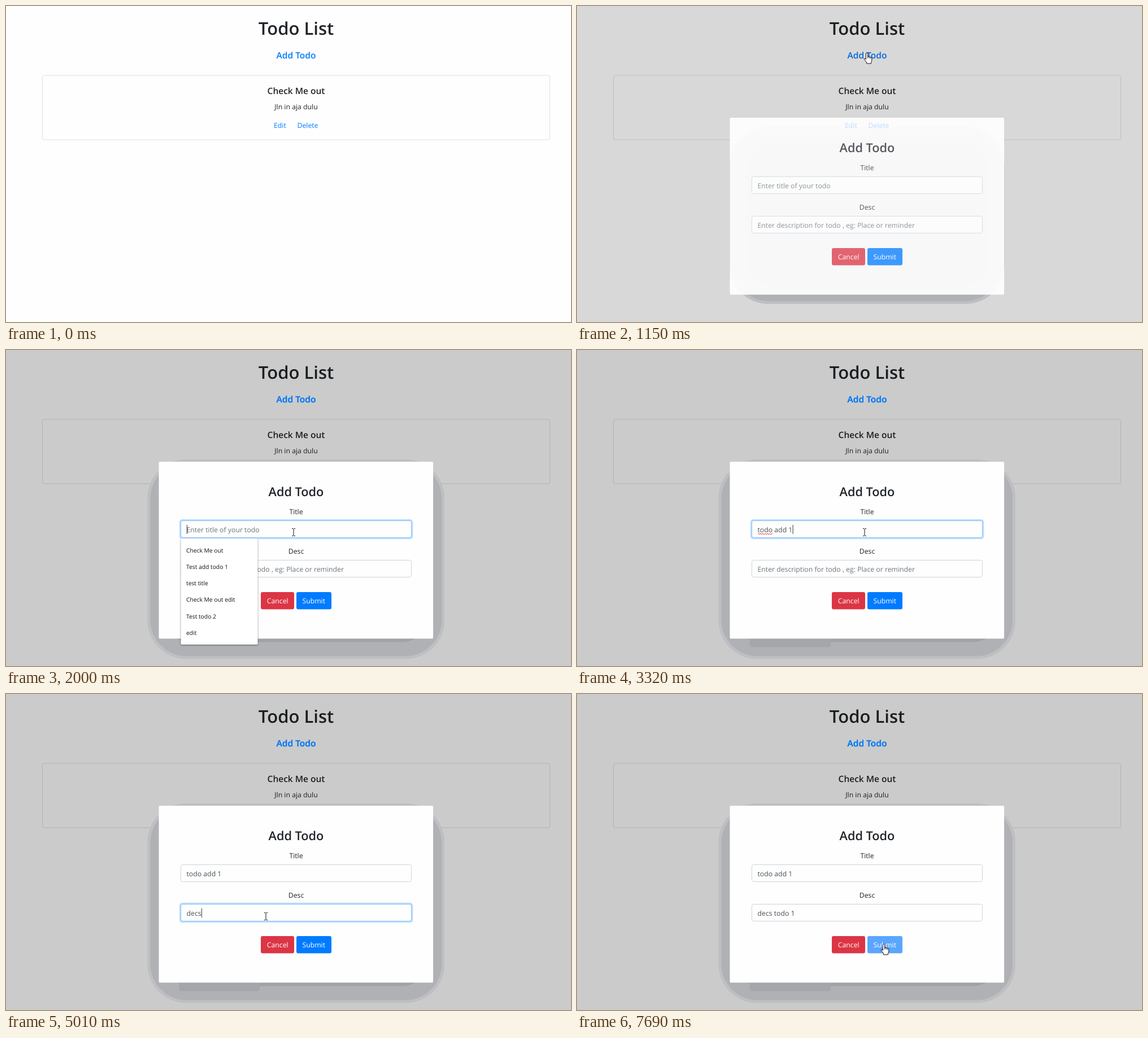
An HTML page that plays this animation: 1000 px wide and 560 px high, repeating every 8000 ms.

```html
<!DOCTYPE html>
<html lang="en">
<head>
<meta charset="utf-8">
<title>Todo List</title>
<style>
  html, body { margin: 0; width: 100%; height: 100%; overflow: hidden; background: #fefefe; }
  svg { display: block; width: 100vw; height: 100vh; }
  text {
    font: 12.26px "Open Sans", "Noto Sans", sans-serif;
    fill: #212529;
    text-rendering: geometricPrecision;
  }
  .mid { text-anchor: middle; }
  .h1 { font-size: 31px; font-weight: 600; }
  .h3 { font-size: 21.7px; font-weight: 600; }
  .h5 { font-size: 15.5px; font-weight: 600; }
  .link { fill: #007bff; }
  .hint { fill: #6c757d; }
  .value { fill: #495057; }
  .onButton { fill: #fff; }
  .option { font-size: 10.3px; font-weight: 500; fill: #111; }
  .caret { stroke: #333; stroke-width: 1; }
  .squiggle { fill: none; stroke: #e33; stroke-width: 1; }
  .list { filter: drop-shadow(0 1px 1.5px rgba(0, 0, 0, .45)); }
  .cursor { fill: #fff; stroke: #111; stroke-width: 1; stroke-linejoin: round; }
</style>
</head>
<body>
<svg id="stage" viewBox="0 0 1000 560" preserveAspectRatio="none"></svg>
<script>
const LOOP = 8000;
const stage = document.getElementById('stage');

function el(parent, tag, attrs = {}, content = '') {
  const node = document.createElementNS('http://www.w3.org/2000/svg', tag);
  set(node, attrs);
  node.textContent = content;
  return parent.appendChild(node);
}
function set(node, attrs) {
  for (const key in attrs) node.setAttribute(key, attrs[key]);
}
const group = (parent = stage) => el(parent, 'g');
const box = (parent, x, y, width, height, rx, attrs) =>
  el(parent, 'rect', { x, y, width, height, rx, ...attrs });
const label = (parent, x, y, content, cls = '') =>
  el(parent, 'text', { x, y, class: cls }, content);
const centered = (parent, x, y, content, cls = '') => label(parent, x, y, content, 'mid ' + cls);
const show = (node, on) => node.setAttribute('visibility', on ? 'visible' : 'hidden');
const fadeTo = (node, opacity) => node.setAttribute('opacity', opacity);

const clamp = v => Math.min(1, Math.max(0, v));
const ramp = (t, from, to) => clamp((t - from) / (to - from));
const within = (t, from, to) => t >= from && t < to;

// cubic-bezier(.25, .1, .25, 1)
function ease(x) {
  const bezier = (u, a, b) => 3 * u * (1 - u) ** 2 * a + 3 * u * u * (1 - u) * b + u ** 3;
  let low = 0, high = 1;
  for (let i = 0; i < 20; i++) {
    const mid = (low + high) / 2;
    if (bezier(mid, .25, .25) < x) low = mid; else high = mid;
  }
  return bezier(low, .1, 1);
}

// Page
const page = group();
box(page, 0, 0, 1000, 560, 0, { fill: '#fefefe' });
centered(page, 513.5, 51, 'Todo List', 'h1');
centered(page, 513.5, 93, 'Add Todo', 'h5 link');
box(page, 64.5, 123, 898, 114, 3, { fill: 'none', stroke: '#dfdfdf' });
centered(page, 513.5, 155.5, 'Check Me out', 'h5');
centered(page, 513.5, 183, 'Jln in aja dulu');

const shade = box(stage, 0, 0, 1000, 560, 0, { fill: '#000' });
const brightLink = centered(stage, 513.5, 93, 'Add Todo', 'h5 link');

// Modal shadow in three tones, from the outer edge inwards
const modal = { x: 270.5, y: 198, width: 485.5, height: 313.5 };
const shadows = [
  { reach: 20, radius: 68, fill: '#bebfc2' },
  { reach: 15, radius: 64, fill: '#b0b1b5' },
  { reach: -10, radius: 44, fill: '#a1a2a8' }
].map(tone => ({ ...tone, node: box(stage, 0, 0, 0, 0, tone.radius, { fill: tone.fill }) }));
const listResidue = box(stage, 306, 505, 143, 21.5, 4, { fill: '#a5a6ab' });

const plate = box(stage, modal.x, modal.y, modal.width, modal.height, 2, { fill: '#fefefe' });
const cardLinks = group();
label(cardLinks, 474, 215.5, 'Edit', 'link');
label(cardLinks, 515.5, 215.5, 'Delete', 'link');

// Modal content
const form = group();
centered(form, 513.5, 259, 'Add Todo', 'h3');

function squiggle(parent, x, y) {
  return el(parent, 'path', { class: 'squiggle', d: `M${x} ${y}q1 -2 2 0` + 't2 0'.repeat(12) });
}

function field(name, top, hint, focusAt, blurAt, keys, squiggles) {
  centered(form, 513.5, top - 11.3, name);
  box(form, 309.5, top + .5, 408, 30, 3, { fill: '#fefefe', stroke: '#ced4da' });
  const ring = group(form);
  box(ring, 308, top - 1, 411, 33, 4, { fill: 'none', stroke: '#bfdeff', 'stroke-width': 2.6 });
  box(ring, 309.5, top + .5, 408, 30, 3, { fill: 'none', stroke: '#80bdff' });
  const baseline = top + 21.2;
  return {
    focusAt, blurAt, keys, ring,
    hint: label(form, 319.5, baseline, hint, 'hint'),
    value: label(form, 319.5, baseline, '', 'value'),
    caret: el(form, 'line', { class: 'caret', y1: top + 8, y2: top + 24 }),
    squiggles: squiggles.map(([x, at]) => ({ at, node: squiggle(form, x, top + 24) }))
  };
}

const fields = [
  field('Title', 302, 'Enter title of your todo', 1850, 4290, {
    text: 'todo add 1',
    times: [2330, 2490, 2580, 2680, 2770, 2860, 2960, 3120, 3290, 3320]
  }, [[320, 2770]]),
  field('Desc', 372, 'Enter description for todo , eg: Place or reminder', 4290, 7290, {
    text: 'decs todo 1',
    times: [4490, 4720, 4970, 5010, 5750, 5880, 6030, 6110, 6190, 6270, 6350]
  }, [[320, 5750], [349, 6270]])
];

box(form, 451, 429, 59, 30.5, 3, { fill: '#dc3545' });
centered(form, 480.7, 449, 'Cancel', 'onButton');
const submit = box(form, 514, 429, 62, 30.5, 3);
centered(form, 544.7, 449, 'Submit', 'onButton');

// Suggestions
function suggestions(width, options) {
  const list = group();
  box(list, 309.5, 334, width, options.length * 29.2 + 12.8, 2, { fill: '#fff', class: 'list' });
  options.forEach((option, i) => label(list, 319, 358.8 + i * 29.2, option, 'option'));
  return list;
}
const allOptions = suggestions(136, ['Check Me out', 'Test add todo 1', 'test title',
  'Check Me out edit', 'Test todo 2', 'edit']);
const fewOptions = suggestions(117, ['Test add todo 1', 'test title', 'Test todo 2']);

// Mouse pointer, each shape drawn around its hot spot
const pointer = group();
const shapes = {
  arrow: 'M0 0V13.5L3.1 10.6L5.2 15.5L7.2 14.6L5.1 9.9H9.5Z',
  hand: 'M-1.6 1.6Q-1.6 0 0 0T1.6 1.6V6.6Q3.2 5.6 4.2 7Q5.8 6.4 6.6 7.9Q8.8 7.4 8.8 9.6V13' +
    'Q8.8 15 7.5 16.5V19H-.3V17L-4.6 11.7Q-5 9.4 -3 10L-1.6 11.5ZM1.6 6.6V9.5M4.2 7V9.7M6.6 7.9V10',
  beam: 'M-3 -6.5H-1L0 -5.5L1 -6.5H3M0 -5.5V5.5M-3 6.5H-1L0 5.5L1 6.5H3'
};
const pointerShapes = {};
for (const kind in shapes) {
  pointerShapes[kind] = el(pointer, 'path', { class: 'cursor', d: shapes[kind] });
}
pointerShapes.beam.setAttribute('fill', 'none');

const route = [
  [80, 913, 548, 'arrow'], [300, 765, 335, 'arrow'], [520, 580, 140, 'arrow'],
  [640, 512, 78, 'hand'], [830, 513, 83, 'hand'], [1360, 513, 83, 'hand'],
  [1410, 512, 106, 'arrow'], [1700, 509, 304, 'beam'], [1800, 509, 323, 'beam'],
  [3670, 509, 323, 'beam'], [3800, 500, 335, 'arrow'], [4010, 474, 374, 'beam'],
  [4200, 460, 394, 'beam'], [6890, 460, 394, 'beam'], [6970, 476, 404, 'arrow'],
  [7150, 530, 434, 'hand'], [7260, 543, 443, 'hand'], [LOOP, 543, 443, 'hand']
];

function drawPointer(t) {
  show(pointer, t >= route[0][0]);
  const i = Math.max(0, route.findIndex(stop => stop[0] > t) - 1);
  const [t0, x0, y0, kind] = route[i], [t1, x1, y1] = route[i + 1];
  const p = ramp(t, t0, t1);
  set(pointer, { transform: `translate(${x0 + (x1 - x0) * p} ${y0 + (y1 - y0) * p})` });
  for (const name in pointerShapes) {
    pointerShapes[name].setAttribute('display', name === kind ? 'inline' : 'none');
  }
}

function drawField(f, t) {
  const typed = f.keys.text.slice(0, f.keys.times.filter(time => time <= t).length);
  const focused = within(t, f.focusAt, f.blurAt);
  f.value.textContent = typed.replace(/ /g, '\u00a0');
  show(f.hint, !typed);
  fadeTo(f.ring, ramp(t, f.focusAt, f.focusAt + 150) - ramp(t, f.blurAt, f.blurAt + 150));
  const x = 320.3 + (typed ? f.value.getComputedTextLength() : 0);
  set(f.caret, { x1: x, x2: x });
  show(f.caret, focused && !within(t, 5540, 5750));
  for (const s of f.squiggles) show(s.node, focused && t >= s.at);
}

function drawModal(t) {
  const fade = ease(ramp(t, 1015, 1315));
  fadeTo(shade, .2 * fade);
  fadeTo(plate, .75 * ramp(t, 1015, 1040) + .25 * fade);
  fadeTo(cardLinks, 1 - fade);
  fadeTo(form, fade);
  show(brightLink, t >= 1320);
  for (const { node, reach } of shadows) {
    const out = reach - 79 * (1 - fade);
    set(node, {
      x: modal.x - out, y: modal.y + 16 - out,
      width: modal.width + 2 * out, height: modal.height + 2 * out
    });
    show(node, fade > .4);
  }
  show(listResidue, t >= 2330);
  show(allOptions, within(t, 1950, 2330));
  show(fewOptions, within(t, 2330, 2490));
  submit.setAttribute('fill',
    t < 7150 ? '#007bff' : t < 7290 ? '#0069d9' : t < 7620 ? '#0062cc' : t < 7690 ? '#0069d9' : '#5aa6fe');
}

const start = performance.now();
function frame() {
  const t = (performance.now() - start) % LOOP;
  drawModal(t);
  fields.forEach(f => drawField(f, t));
  drawPointer(t);
  requestAnimationFrame(frame);
}
frame();
</script>
</body>
</html>
```
